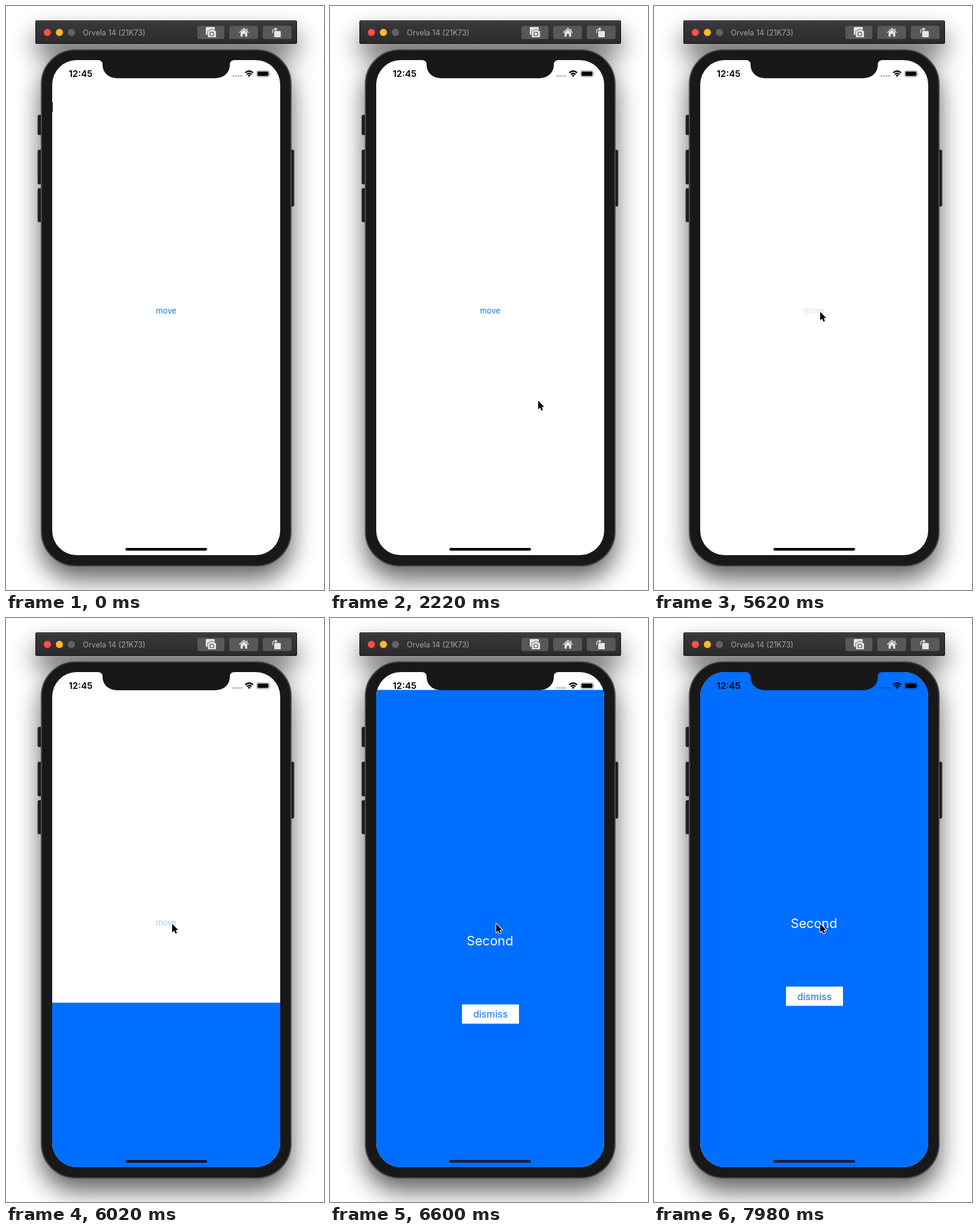
Animation, 530 px wide and 972 px high, one loop 8 s. Source, as an HTML page:

```html
<!DOCTYPE html>
<html lang="en">
<head>
<meta charset="utf-8">
<title>Modal sheet demo</title>
<style>
  html, body { margin: 0; width: 100%; height: 100%; overflow: hidden; background: #fff; }
  svg { display: block; width: 530px; height: 972px; }
  text { font-family: Inter, Roboto, sans-serif; }
  .mid { text-anchor: middle; }
</style>
</head>
<body>
<svg viewBox="0 0 530 972">
  <defs>
    <clipPath id="screen"><rect x="77" y="90" width="380" height="824" rx="41"/></clipPath>
    <filter id="blur" filterUnits="userSpaceOnUse" x="-80" y="-60" width="690" height="1140">
      <feGaussianBlur stdDeviation="21"/>
    </filter>
    <filter id="soft" x="-50%" y="-50%" width="200%" height="200%">
      <feGaussianBlur stdDeviation="1"/>
    </filter>
    <linearGradient id="bar" x2="0" y2="1">
      <stop stop-color="#3a383b"/><stop offset="1" stop-color="#2c2a2d"/>
    </linearGradient>
    <path id="arrow" d="M0 0V14.2L3.2 11.3L5.4 16.3L7.9 15.2L5.8 10.3H10Z"/>
  </defs>

  <rect width="530" height="972" fill="#fff"/>
  <g filter="url(#blur)" opacity=".62">
    <rect x="50" y="45" width="434" height="38"/>
    <rect x="58" y="92" width="418" height="862" rx="58"/>
  </g>

  <!-- window bar -->
  <rect x="49.5" y="24.5" width="435" height="38" rx="1.5" fill="url(#bar)" stroke="#0b0a0b"/>
  <path d="M51 25.5H483" stroke="#59575a"/>
  <circle cx="69" cy="44" r="6" fill="#fd4e47"/>
  <circle cx="89" cy="44" r="6" fill="#fdb827"/>
  <circle cx="109" cy="44" r="6" fill="#636165"/>
  <text x="128" y="49" font-size="12.6" fill="#a5a3a6">Orvela 14 (21K73)</text>
  <g fill="#59575a">
    <rect x="319" y="33" width="45" height="22" rx="3.5"/>
    <rect x="372" y="33" width="48" height="22" rx="3.5"/>
    <rect x="428" y="33" width="48" height="22" rx="3.5"/>
  </g>
  <g fill="#e6e4e7">
    <rect x="333" y="35" width="15" height="13" rx="1.5"/>
    <path d="M337.5 41H339.5L341 39H346L347.5 41H349Q350.500 41 350.500 42.500V51Q350.500 52.500 349 52.500H337.500Q336 52.500 336 51V42.500Q336 41 337.500 41Z" stroke="#59575a" stroke-width=".9"/>
    <circle cx="343" cy="46.500" r="3.200" fill="none" stroke="#59575a" stroke-width="1.300"/>
    <path d="M391 44L396.500 39L402 44V51H398.500V46.500H394.500V51H391Z"/>
    <path d="M388.500 44.500L396.500 37L404.500 44.500M401.500 37.500V41" fill="none" stroke="#e6e4e7" stroke-width="1.400"/>
    <rect x="447" y="41.500" width="11" height="10.500" rx="1.500"/>
    <path d="M444.500 45V42Q444.500 38.500 448 38.500H449" fill="none" stroke="#e6e4e7" stroke-width="1.300"/>
    <path d="M448.500 35.500L452.500 38.500L448.500 41.500Z"/>
  </g>

  <!-- handset -->
  <g fill="#1d1d1d" stroke="#444" stroke-width="1">
    <rect x="53" y="181.500" width="9" height="33" rx="2"/>
    <rect x="53" y="239.500" width="9" height="57" rx="2"/>
    <rect x="53" y="303.500" width="9" height="56" rx="2"/>
    <rect x="471" y="239.500" width="9" height="94" rx="2"/>
  </g>
  <rect x="59" y="73" width="416" height="859" rx="57" fill="#181818" stroke="#4c4c4c" stroke-width="2"/>

  <g clip-path="url(#screen)">
    <rect x="77" y="90" width="380" height="824" fill="#fff"/>
    <rect id="mark" x="77" y="160" width="1" height="16" fill="#333"/>
    <text id="move" class="mid" x="267" y="512" font-size="13.200" fill="#0f7ddd">move</text>
    <g id="sheet">
      <rect x="77" y="90" width="380" height="826" fill="#006eff"/>
      <text class="mid" x="266.500" y="515.500" font-size="21.600" fill="#fff">Second</text>
      <rect x="220" y="613.500" width="95" height="32" fill="#fff"/>
      <text class="mid" x="267.500" y="635.500" font-size="16.200" fill="#0a72e6">dismiss</text>
    </g>
    <text x="104.500" y="118" font-size="15" font-weight="600">12:45</text>
    <g opacity=".23">
      <circle cx="378.800" cy="116.300" r="1.900"/><circle cx="383.200" cy="116.300" r="1.900"/>
      <circle cx="387.600" cy="116.300" r="1.900"/><circle cx="392" cy="116.300" r="1.900"/>
    </g>
    <g fill="none" stroke="#000" stroke-width="2.300">
      <path d="M398.800 111.200Q405.300 105.400 411.800 111.200"/>
      <path d="M401.300 114Q405.300 110.400 409.300 114"/>
    </g>
    <path d="M402.900 115.500Q405.300 113.600 407.700 115.500L405.300 118Z"/>
    <rect x="417.500" y="107.500" width="21.500" height="10.500" rx="3" fill="none" stroke="#000" stroke-opacity=".38"/>
    <rect x="419" y="109" width="18.500" height="7.500" rx="1.700"/>
    <path d="M440.200 111Q442 112.700 440.200 114.500Z" opacity=".45"/>
    <rect id="home" x="199" y="902" width="136" height="4.600" rx="2.300"/>
  </g>
  <path d="M153 89V90Q161 90 161 98C161 111 171 120.300 187 120.300H347C363 120.300 373 111 373 98Q373 90 381 90V89Z" fill="#181818"/>

  <g id="cursor">
    <use href="#arrow" y="1" opacity=".4" filter="url(#soft)"/>
    <use href="#arrow" stroke="#fff" stroke-width="2" stroke-linejoin="round"/>
    <use href="#arrow"/>
  </g>
</svg>
<script>
const LOOP = 8000;
const $ = id => document.getElementById(id);
const [mark, move, sheet, home, cursor] = ["mark", "move", "sheet", "home", "cursor"].map($);
const clamp = (v, a = 0, b = 1) => Math.min(b, Math.max(a, v));

// step, x, y of the pointer tip
const path = [
  [0, 449, 945], [16, 422, 844], [33, 355, 686], [46, 347, 657], [51, 317, 610],
  [69, 299, 562], [78, 292, 539], [87, 285, 514], [105, 279, 511], [118, 277, 509]
];
const PRESS = 115, RELEASE = 122, OPEN = 124.1;

function stepAt(t) {
  if (t < 20) return -1;
  const k = Math.floor((t - 20) / 140), r = (t - 20) % 140;
  return 3 * k + (r < 100 ? 0 : r < 120 ? 1 : 2);
}

function pointer(n) {
  const i = path.findIndex(p => p[0] > n);
  if (i < 0) return path[path.length - 1].slice(1);
  const [n0, x0, y0] = path[i - 1], [n1, x1, y1] = path[i];
  const u = (n - n0) / (n1 - n0);
  return [x0 + (x1 - x0) * u, y0 + (y1 - y0) * u];
}

// Critically damped spring, 824 px down to 0
function sheetOffset(n) {
  const s = Math.max(0, (n - OPEN) * 0.304);
  return 824 * (1 + s) * Math.exp(-s);
}

function draw(t) {
  const n = stepAt(t);
  mark.style.display = n < 0 ? "" : "none";
  cursor.style.display = n < 0 ? "none" : "";
  if (n >= 0) {
    const [x, y] = pointer(n);
    cursor.setAttribute("transform", `translate(${x.toFixed(1)} ${y.toFixed(1)})`);
  }
  move.setAttribute("opacity", n < PRESS ? 1 : 0.22 + 0.78 * clamp((n - RELEASE) / 28));
  sheet.style.display = n < OPEN ? "none" : "";
  sheet.setAttribute("transform", `translate(0 ${sheetOffset(n).toFixed(2)})`);
  const c = clamp((n - OPEN) / 6);
  home.setAttribute("fill", `rgb(${28 * c},${32 * c},${40 * c})`);
}

const start = performance.now();
function tick() {
  draw((performance.now() - start) % LOOP);
  requestAnimationFrame(tick);
}
draw(0);
requestAnimationFrame(tick);
</script>
</body>
</html>
```
